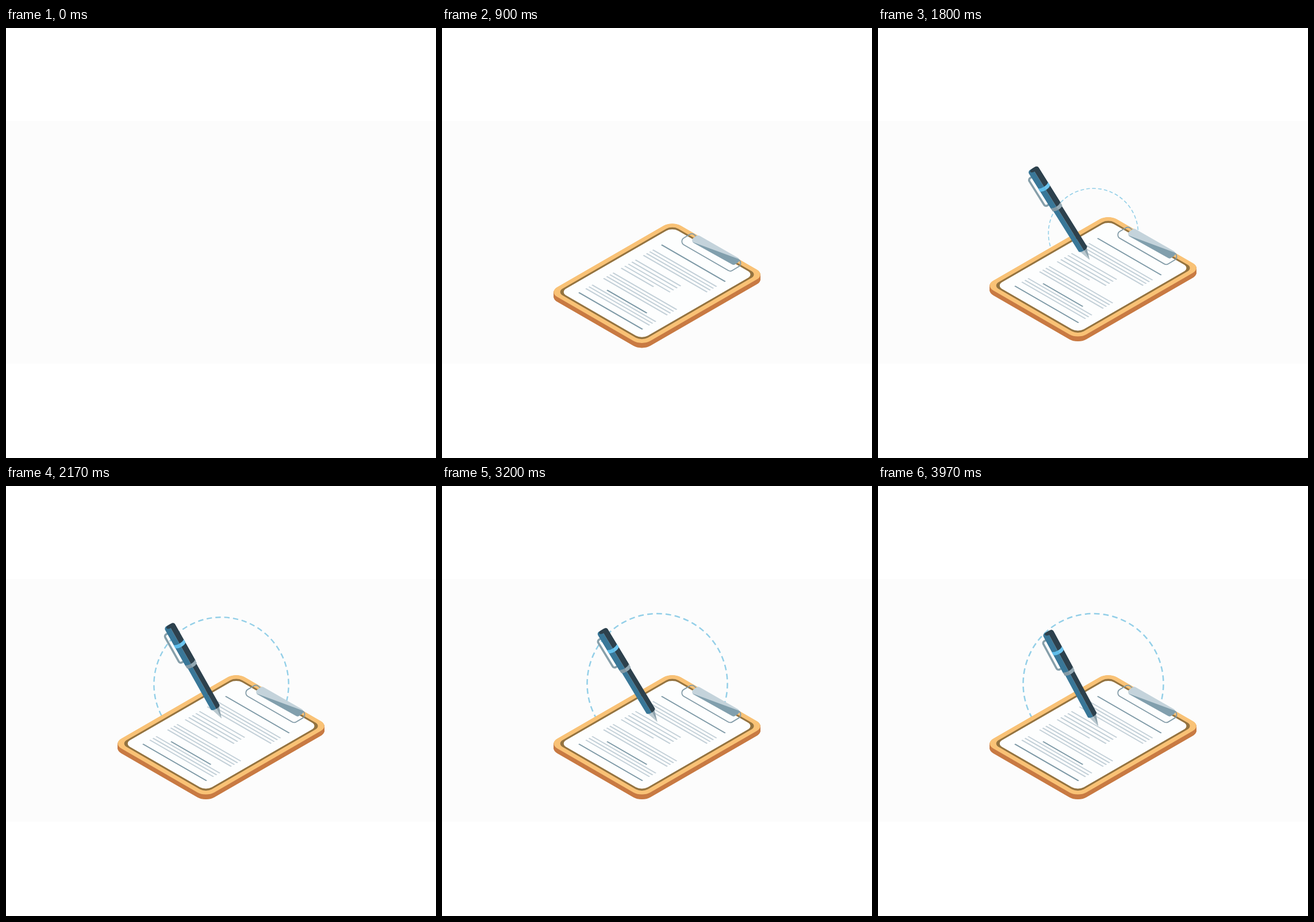
Recreate the animation shown at these times as an HTML page with a canvas. Size 748 px wide and 748 px high, loop 4010 ms.

```html
<!DOCTYPE html>
<html lang="en">
<head>
<meta charset="utf-8">
<title>Signing a document</title>
<style>
html, body { margin: 0; width: 100%; height: 100%; overflow: hidden; background: #fff; }
canvas { display: block; }
</style>
</head>
<body>
<canvas id="stage" width="748" height="748"></canvas>
<script>
const ctx = document.getElementById('stage').getContext('2d');
const LOOP = 4010;
const ARRIVE = { board: 575, pen: 1275, ring: 1855 };
const GROW_MS = 150;
const LIGHT = '#c3d0d8', DARK = '#7d99a6', STEEL = '#839ca8';
const TEAL = '#397798', NAVY = '#2d414d';
const rad = deg => deg * Math.PI / 180;

// Damped swing after a part reaches its resting place.
const swing = (s, decay) => Math.sin(4 * Math.PI * s) * Math.exp(-decay * s);

function popScale(t, arrive) {
  if (t < arrive) return Math.max(0, 1 - (arrive - t) / GROW_MS);
  return 1 + 0.492 * swing((t - arrive) / 1000, 7);
}

function boardOffset(t) {
  return t < ARRIVE.board ? 1.75 * (ARRIVE.board - t) : -71 * swing((t - ARRIVE.board) / 1000, 5);
}

// The pen scribbles sideways while it drifts down the page.
function penPose(t, scale) {
  const phase = rad(1.24 * (t - 2830));
  const drift = Math.max(0, (t - 1370) / 2600) ** 2;
  return {
    x: 375.5 + 8 * Math.cos(phase),
    y: 402.5 + 15 * drift,
    tilt: 30.1 - 1.8 * Math.cos(phase + rad(30)) + 40 * (scale - 1)
  };
}

function scaleAboutCenter(s) {
  ctx.translate(374, 380);
  ctx.scale(s, s);
  ctx.translate(-374, -380);
}

function polygon(points, color) {
  ctx.beginPath();
  points.forEach(p => ctx.lineTo(...p));
  ctx.closePath();
  ctx.fillStyle = color;
  ctx.fill();
}

function roundedPath(points, r) {
  ctx.moveTo(...points[0]);
  for (let i = 1; i < points.length - 1; i++) ctx.arcTo(...points[i], ...points[i + 1], r);
  ctx.lineTo(...points[points.length - 1]);
}

// Runs a drawing in the plane of the board: x to the lower right, y to the lower left.
function onPlane(drop, paint) {
  ctx.save();
  ctx.transform(0.866, 0.5, -0.866, 0.5, 400, 323.5 + drop);
  paint();
  ctx.restore();
}

function slab(inset, r, color, drop = 0) {
  onPlane(drop, () => {
    ctx.beginPath();
    ctx.roundRect(inset, inset, 187 - 2 * inset, 248 - 2 * inset, r);
    ctx.fillStyle = color;
    ctx.fill();
  });
}

function textRow(y, color = DARK, length = 128, x = 31) {
  ctx.fillStyle = color;
  ctx.fillRect(x, y - 1.15, length, 2.3);
}

function paragraph(y, rows, length, gap = 6.3) {
  for (let i = 0; i < rows; i++) textRow(y + i * gap, LIGHT, length);
}

function drawText() {
  textRow(52.5);
  paragraph(70, 4);
  paragraph(105, 4, 91, 7.1);
  paragraph(133.5, 1, 65);
  paragraph(150, 4);
  textRow(186, DARK, 80, 55);
  paragraph(192, 3);
  textRow(218.6);
}

function drawClamp() {
  ctx.beginPath();
  roundedPath([[443, 352], [435, 344.5], [410, 359.5], [501, 412], [525, 397.5], [514, 390]], 7);
  ctx.lineWidth = 1.8;
  ctx.strokeStyle = STEEL;
  ctx.stroke();

  ctx.save();
  ctx.beginPath();
  roundedPath([[437.5, 353], [445, 348], [521, 391.5], [507, 401], [430, 358], [437.5, 353]], 5);
  ctx.fillStyle = '#c4d3db';
  ctx.fill();
  ctx.clip();
  polygon([[430, 358.5], [522, 392.5], [507, 403], [430, 360]], '#819fad');
  ctx.restore();
}

function drawBoard(t) {
  ctx.save();
  ctx.translate(0, boardOffset(t));
  for (let drop = 8.5; drop > 0; drop -= 0.5) slab(0, 17, '#c87a43', drop);
  slab(0, 17, '#f9c276');
  slab(8, 12, '#94733f');
  slab(11.5, 12, '#fdfefe');
  onPlane(0, drawText);
  drawClamp();
  ctx.restore();
}

function drawRing(t) {
  const s = popScale(t, ARRIVE.ring);
  if (s <= 0) return;
  const step = 2 * Math.PI * 122 / 48;
  ctx.save();
  scaleAboutCenter(s);
  ctx.translate(374, 343.5);
  ctx.rotate(t / 5000);
  ctx.setLineDash([step * 0.61, step * 0.39]);
  ctx.lineWidth = 2.5;
  ctx.strokeStyle = '#93cfe8';
  ctx.beginPath();
  ctx.arc(0, 0, 122, 0, 2 * Math.PI);
  ctx.stroke();
  ctx.restore();
}

// Barrel section between two heights, with both ends bowed toward the tip.
function barrel(top, bottom, half, left, right) {
  for (const [side, color] of [[-half, left], [half, right]]) {
    ctx.beginPath();
    ctx.moveTo(0, top + 3);
    ctx.quadraticCurveTo(side * 0.7, top + 3, side, top);
    ctx.lineTo(side, bottom);
    ctx.quadraticCurveTo(side * 0.7, bottom + 3, 0, bottom + 3);
    ctx.closePath();
    ctx.fillStyle = color;
    ctx.fill();
  }
}

function drawPen(t) {
  const s = popScale(t, ARRIVE.pen);
  if (s <= 0) return;
  const pose = penPose(t, s);
  ctx.save();
  scaleAboutCenter(s);
  ctx.translate(pose.x, pose.y);
  ctx.rotate(-rad(pose.tilt));

  ctx.beginPath();
  roundedPath([[-8, -175], [-16.3, -175], [-16.3, -119], [-8, -119]], 4);
  ctx.lineWidth = 3.6;
  ctx.strokeStyle = '#869faa';
  ctx.stroke();

  polygon([[0, 0], [-7, -22], [1, -22]], '#b9c8cf');
  polygon([[0, 0], [1, -22], [7, -22]], '#8fa3ad');
  barrel(-108, -22, 8.6, TEAL, NAVY);

  ctx.save();
  ctx.beginPath();
  ctx.roundRect(-10.2, -187, 20.4, 90, 5);
  ctx.clip();
  barrel(-192, -110, 10.2, TEAL, NAVY);
  ctx.beginPath();
  ctx.ellipse(1.5, -184, 8, 3.6, 0, 0, 2 * Math.PI);
  ctx.fillStyle = NAVY;
  ctx.fill();
  ctx.restore();

  barrel(-152.5, -146, 10.2, '#5fbdea', '#6cc4ee');
  barrel(-112, -105.5, 9.8, '#8299a5', '#93a8b2');
  ctx.restore();
}

function draw(t) {
  ctx.fillStyle = '#fff';
  ctx.fillRect(0, 0, 748, 748);
  ctx.save();
  ctx.beginPath();
  ctx.rect(0, 162, 747, 422);
  ctx.clip();
  ctx.fillStyle = '#fcfcfc';
  ctx.fillRect(0, 162, 747, 422);
  ctx.translate(0.5, 0.5);
  drawRing(t);
  drawBoard(t);
  drawPen(t);
  ctx.restore();
}

const start = performance.now();
function tick() {
  draw((performance.now() - start) % LOOP);
  requestAnimationFrame(tick);
}
tick();
</script>
</body>
</html>
```
